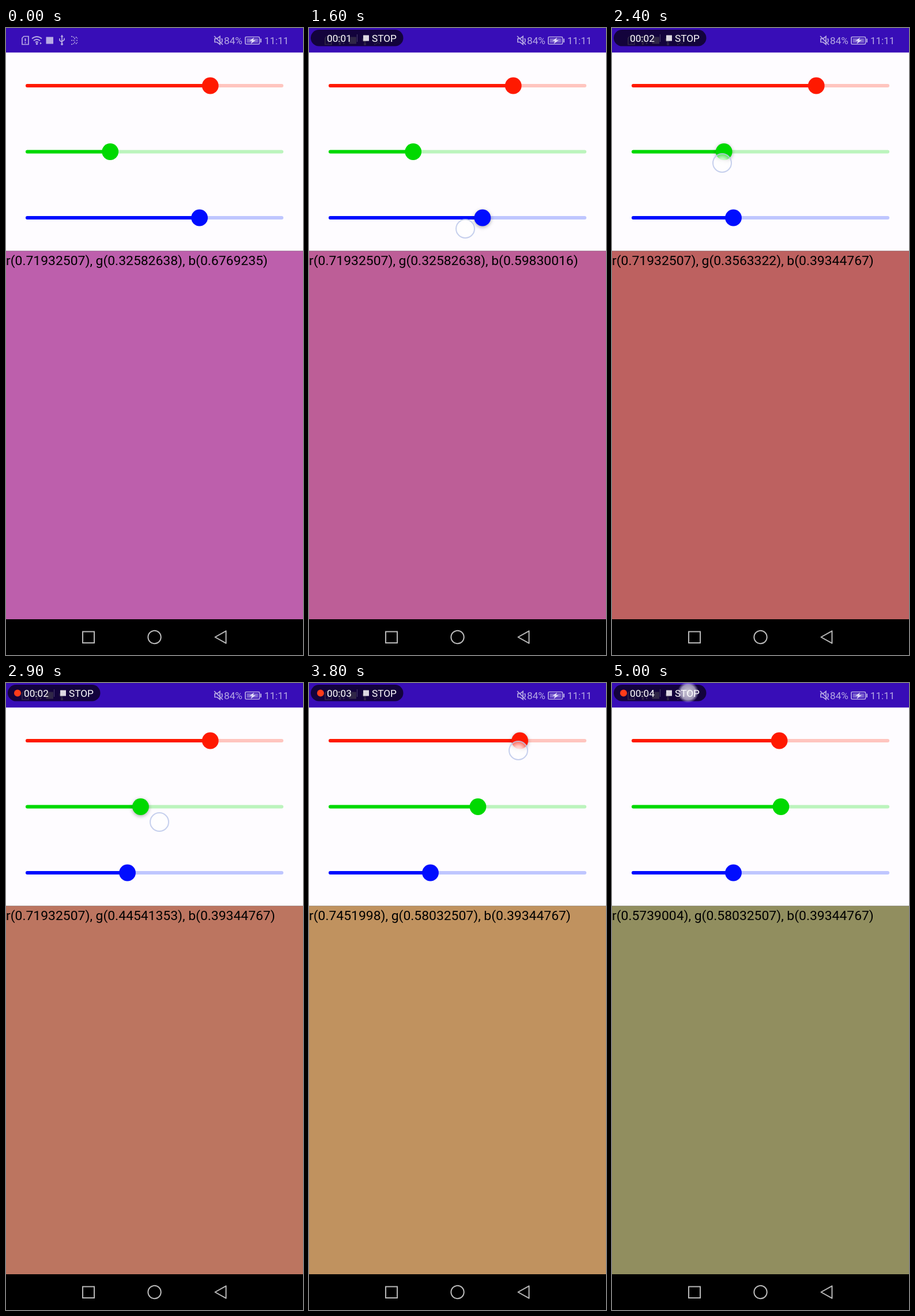
An HTML page that plays this animation: 515x1087 px, repeating every 5.1 s.

```html
<!DOCTYPE html>
<html lang="en">
<head>
<meta charset="utf-8">
<title>RGB sliders</title>
<style>
  html, body { margin: 0; width: 100%; height: 100%; overflow: hidden; background: #000; }
  svg { display: block; width: 515px; height: 1087px; font-family: Roboto, sans-serif; }
  .track { stroke-width: 6; stroke-linecap: round; }
  .drag { filter: drop-shadow(0 2px 3px rgba(0, 0, 0, .32)); }
  .line { fill: none; stroke: #b7aae4; stroke-width: 1.7; }
</style>
</head>
<body>
<svg viewBox="0 0 515 1087">
  <defs>
    <radialGradient id="spot">
      <stop offset="0" stop-color="#fff" stop-opacity=".92"/>
      <stop offset=".5" stop-color="#fff" stop-opacity=".75"/>
      <stop offset="1" stop-color="#fff" stop-opacity=".35"/>
    </radialGradient>
    <radialGradient id="glow">
      <stop offset="0" stop-color="#fff" stop-opacity=".8"/>
      <stop offset=".7" stop-color="#f0ecff" stop-opacity=".62"/>
      <stop offset="1" stop-color="#d8d0ff" stop-opacity="0"/>
    </radialGradient>
  </defs>

  <rect width="515" height="1087" fill="#fefcff"/>
  <rect width="515" height="42.5" fill="#380db7"/>
  <rect id="panel" y="386.5" width="515" height="638.5"/>
  <rect y="386" width="515" height="1" fill="#000" opacity=".25"/>
  <text id="label" x="0" y="411" font-size="22.9"></text>

  <!-- status icons -->
  <g class="line">
    <path d="M31 14.5h8v14H28v-11z"/>
    <path d="M33.5 18v5M33.5 24.5v2" stroke-width="2"/>
    <path d="M45 18.5q8.500-7 17 0M48 22q5.500-4.500 11 0M51 25q2.500-2 5 0" stroke-width="2"/>
    <path d="M97 14v14M93 18v3.500l4 3M101 17.500v3l-4 3"/>
    <path d="M113 14.500q7 1 6 5.500M113 28.500q7-1 6-5.500M113 21.500h7" stroke-dasharray="2 1.200"/>
    <path d="M121 15.500l3 2.500M121 27.500l3-2.500M122 21.500h3" stroke-dasharray="2 1"/>
    <path d="M362 18.500h4l5-4v14l-5-4h-4zM361 14l15 15M374 18q2 3.500 0 7"/>
    <rect x="415" y="15.500" width="24.500" height="12.500" rx="1.500"/>
    <path d="M442 18.500v6.500" stroke-width="2"/>
  </g>
  <g fill="#b7aae4">
    <circle cx="53.500" cy="27.500" r="1.800"/>
    <path d="M59 24.500l3 2-3 2z"/>
    <rect x="69.500" y="15.500" width="12.500" height="12"/>
    <path d="M97 11.500l2.500 4h-5z"/>
    <circle cx="97" cy="28" r="2"/>
    <rect x="417.500" y="18" width="19.500" height="7.500" opacity=".55"/>
    <path d="M430 16.500l-8 6h4.500l-2 5 8.500-6.500h-4.500z" fill="#e4defa"/>
    <text x="378" y="28" font-size="17.200">84%</text>
    <text x="448" y="28" font-size="17">11:11</text>
  </g>

  <g id="sliders"></g>

  <!-- navigation bar -->
  <rect y="1025" width="515" height="62" fill="#000"/>
  <g fill="none" stroke="#b8b8b8" stroke-width="2">
    <rect x="133" y="1046.500" width="20" height="19.500"/>
    <circle cx="257.500" cy="1056" r="11.200"/>
    <path d="M362.500 1056l19-10.700v21.400z" stroke-linejoin="round"/>
  </g>

  <!-- recorder pill -->
  <g id="pill">
    <rect x="3" y="3" width="160.500" height="28.500" rx="14.250" fill="#080018" opacity=".77"/>
    <circle id="dot" cx="20" cy="17.500" r="6" fill="#ff3c1a"/>
    <path d="M83.500 11v13" stroke="#4b4170"/>
    <rect x="94" y="12.500" width="10" height="10" fill="#dcd8e2"/>
    <circle id="press" cx="132" cy="16" r="18.500" fill="url(#glow)"/>
    <g fill="#fff" font-size="17.200">
      <text id="clock" x="31" y="24"></text>
      <text x="109" y="24">STOP</text>
    </g>
  </g>

  <circle id="touch" r="16" fill="url(#spot)" stroke="#bcc8ea" stroke-opacity=".85" stroke-width="2"/>
</svg>

<script>
const LOOP = 5100, STEP = 100;
const $ = id => document.getElementById(id);
const show = (el, on) => el.setAttribute('visibility', on ? 'visible' : 'hidden');
const set = (el, attrs) => { for (const k in attrs) el.setAttribute(k, attrs[k]); };

function add(parent, tag, attrs) {
  const el = document.createElementNS('http://www.w3.org/2000/svg', tag);
  set(el, attrs);
  return parent.appendChild(el);
}

const ease = {
  in: u => u * u,
  out: u => 1 - (1 - u) ** 2,
  both: u => u * u * (3 - 2 * u),
  line: u => u
};

// keys: [time, value, easing towards this key]; press, drag, end: touch phases
const sliders = [
  { y: 100, color: '#ff1900', rest: '#ffc5bf', press: 3600, drag: 3800, end: 4500,
    keys: [[3700, .71932507], [3800, .7451998, 'line'], [4500, .5739004, 'both']] },
  { y: 214.5, color: '#00d900', rest: '#bcf4bd', press: 2200, drag: 2400, end: 3300,
    keys: [[2300, .32582638], [2400, .3563322, 'line'], [2900, .44541353, 'in'], [3300, .58032507, 'out']] },
  { y: 329, color: '#000dff', rest: '#bfc6ff', press: 900, drag: 1300, end: 2000,
    keys: [[1300, .6769235], [1600, .59830016, 'in'], [2000, .39344767, 'out']] }
];

// finger paths: [time, x, y]
const strokes = [
  [[900, 346, 344], [1200, 346, 344], [1400, 318, 346], [1600, 271, 348], [1900, 215, 350], [2000, 210, 350]],
  [[2200, 194, 232], [2400, 191, 234], [2700, 222, 238], [2900, 266, 241], [3200, 293, 242]],
  [[3600, 366, 115], [3800, 363, 117], [4100, 328, 118], [4400, 290, 119]]
];

function at(keys, t, col = 1) {
  if (t <= keys[0][0]) return keys[0][col];
  for (let i = 1; i < keys.length; i++) {
    const a = keys[i - 1], b = keys[i];
    if (t <= b[0]) {
      const f = ease[b[3 - col]] || ease.line;
      return a[col] + (b[col] - a[col]) * f((t - a[0]) / (b[0] - a[0]));
    }
  }
  return keys[keys.length - 1][col];
}

const thumbX = v => 37 + 441 * v;

for (const s of sliders) {
  const g = $('sliders'), line = { class: 'track', x1: 37, x2: 478, y1: s.y, y2: s.y };
  add(g, 'line', { ...line, stroke: s.rest });
  s.fill = add(g, 'line', { ...line, stroke: s.color });
  s.ripple = add(g, 'circle', { cy: s.y, fill: '#000' });
  s.thumb = add(g, 'circle', { cy: s.y, r: 14.4, fill: s.color });
}

// recorded screens mix two video colour matrices, which shifts every hue a little
function screenColor(r, g, b) {
  const mix = [
    1.086 * r - .072 * g - .014 * b - .008,
    .097 * r + .845 * g + .058 * b - .012,
    -.014 * r - .027 * g + 1.041 * b - .012
  ];
  return `rgb(${mix.map(c => Math.round(c * 255)).join(',')})`;
}

function draw(t) {
  const vals = sliders.map(s => {
    const v = at(s.keys, t), x = thumbX(v);
    s.fill.setAttribute('x2', x);
    s.thumb.setAttribute('cx', x);
    s.thumb.setAttribute('class', t >= s.drag && t <= s.end ? 'drag' : '');
    show(s.ripple, t >= s.press && t <= s.drag && t < s.press + 500);
    set(s.ripple, {
      cx: x,
      r: 14 + 20 * Math.min(1, (t - s.press + 80) / 200),
      opacity: t < s.drag ? .13 : 0
    });
    return v;
  });

  $('panel').setAttribute('fill', screenColor(...vals));
  const [r, g, b] = vals.map(v => +v.toPrecision(8));
  $('label').textContent = `r(${r}), g(${g}), b(${b})`;

  const path = strokes.find(p => t >= p[0][0] && t <= p[p.length - 1][0]);
  show($('touch'), path);
  if (path) set($('touch'), { cx: at(path, t, 1), cy: at(path, t, 2) });

  const clock = t - 300;
  $('pill').setAttribute('opacity', t < 100 ? 0 : t < 200 ? .6 : 1);
  $('clock').textContent = '00:0' + Math.max(0, Math.floor(clock / 1000));
  show($('dot'), clock >= 0 && clock % 1000 >= 500);
  show($('press'), t >= 4800);
}

let start;
function tick(now) {
  start ??= now;
  draw(Math.floor((now - start) % LOOP / STEP) * STEP);
  requestAnimationFrame(tick);
}
draw(0);
requestAnimationFrame(tick);
</script>
</body>
</html>
```
